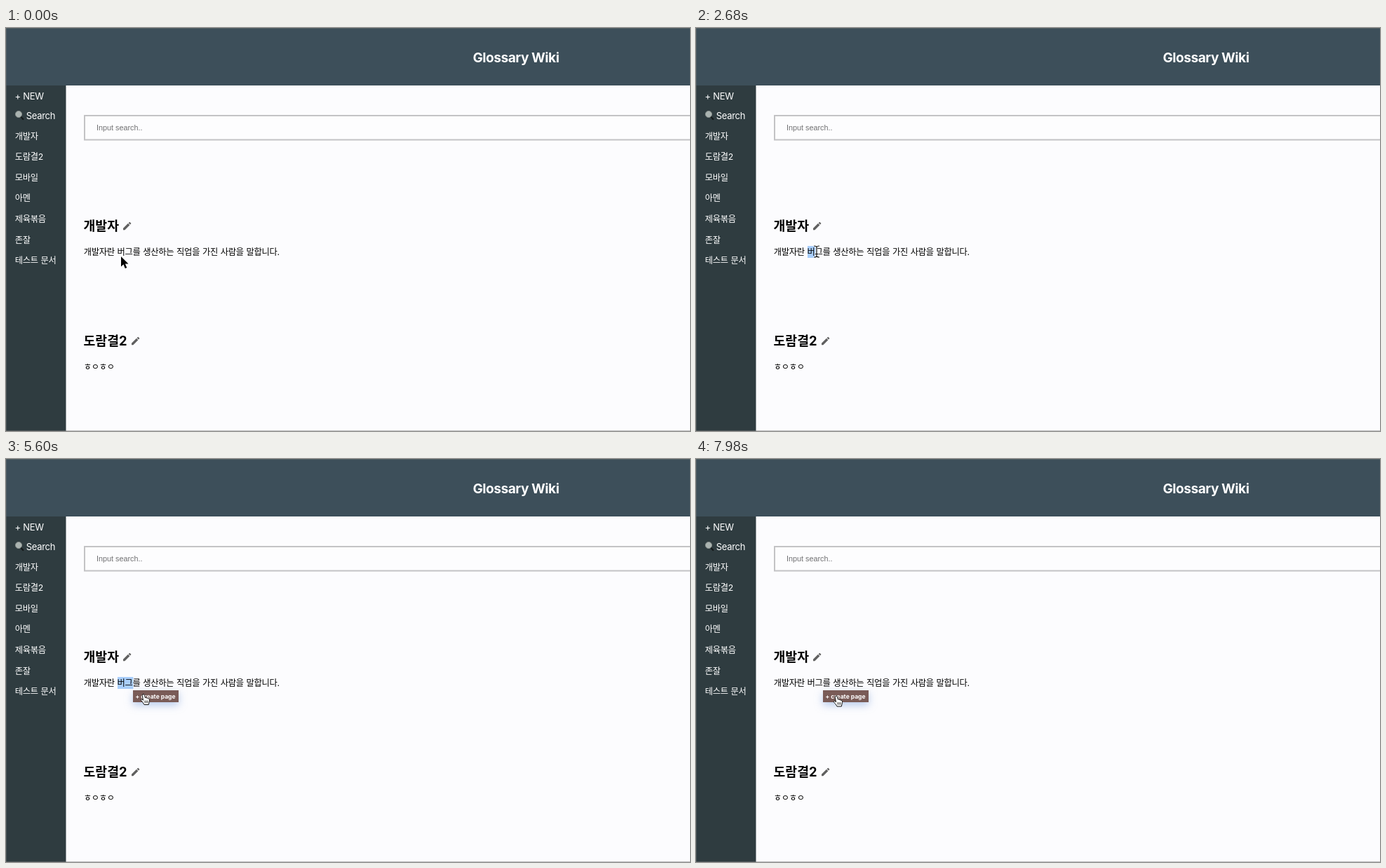
An HTML page for the animation above (8 s loop, 975 by 575 pixels).

```html
<!DOCTYPE html>
<html lang="ko">
<head>
<meta charset="utf-8">
<title>Glossary Wiki</title>
<style>
  html, body { margin: 0; width: 100%; height: 100%; overflow: hidden; background: #fcfcfe; }
  svg { display: block; }
  text { font-family: Inter, "Noto Sans CJK KR", "Noto Sans CJK", sans-serif; white-space: pre; }
  .latin { font-size: 13px; letter-spacing: -.3px; fill: #fff; }
  .ko { font-size: 12.3px; letter-spacing: -.3px; word-spacing: .6px; }
  .side { fill: #fff; }
  .heading { font-size: 18.3px; font-weight: 700; }
  .title { font-size: 19px; font-weight: 700; letter-spacing: -.42px; fill: #fff; }
  .hint { font: 10.8px "Liberation Sans", Arial, sans-serif; fill: #707072; }
  .tip { font-size: 8.5px; font-weight: 700; fill: #fff; }
  #tooltip rect { filter: drop-shadow(0 4px 6px rgba(110, 150, 215, .5)); }
</style>
</head>
<body>
<svg width="975" height="575" viewBox="0 0 975 575">
  <defs>
    <path id="pencil" transform="scale(.63) translate(-3 -3)" fill="#606060"
      d="M3 17.25V21h3.75L17.81 9.94l-3.75-3.75L3 17.25zM20.71 7.04a1 1 0 0 0 0-1.41l-2.34-2.34a1 1 0 0 0-1.41 0l-1.83 1.83 3.75 3.75 1.83-1.83z"/>
    <path id="beamShape" d="M-3.5-8Q0-8 0-6Q0-8 3.5-8M0-6V6M-3.5 8Q0 8 0 6Q0 8 3.5 8M-2 3.5H2"/>
  </defs>

  <rect width="975" height="575" fill="#fcfcfe"/>
  <rect width="975" height="82" fill="#3d4f5a"/>
  <rect y="82" width="85.5" height="493" fill="#2f3c40"/>
  <rect width="975" height="1" fill="#535f62"/>
  <rect y="574" width="975" height="1" fill="#777" opacity=".45"/>
  <rect width="1" height="575" fill="#666d6d" opacity=".5"/>
  <text class="title" x="665.5" y="48.5">Glossary Wiki</text>

  <text class="latin" x="12.5" y="101.5">+ NEW</text>
  <path d="M21 126.5L24.3 130" stroke="#151a1b" stroke-width="2.2" stroke-linecap="round"/>
  <circle cx="18" cy="123" r="4.6" fill="#aab3b0" stroke="#858d8a"/>
  <text class="latin" x="28.7" y="129.5">Search</text>
  <g id="menu"></g>

  <rect x="112" y="125" width="900" height="34.5" fill="#fdfdfe" stroke="#c3c3c5" stroke-width="2"/>
  <text class="hint" x="129" y="145.7">Input search..</text>

  <rect id="selection" x="159" y="311" height="17" fill="#a9cefb"/>
  <text class="heading" x="110.5" y="289">개발자</text>
  <use href="#pencil" x="0" y="0" transform="translate(167 276.8)"/>
  <text class="ko" x="110.7" y="323.6">개발자란 버그를 생산하는 직업을 가진 사람을 말합니다.</text>
  <text class="heading" x="110.5" y="453">도람결2</text>
  <use href="#pencil" transform="translate(179 440.8)"/>
  <text class="ko" x="110.7" y="487.6">ㅎㅇㅎㅇ</text>

  <g id="tooltip">
    <rect x="181" y="330" width="65" height="17" fill="#795b57"/>
    <text class="tip" x="184.5" y="341.6">+ create page</text>
  </g>

  <g id="pointer" stroke-linejoin="round" stroke-linecap="round">
    <path id="arrow" d="M0 0V14.5L3.4 11.3L5.8 17L8.3 16L5.9 10.4H10.5Z" stroke="#fff" stroke-width="1.2" paint-order="stroke"/>
    <g id="beam" fill="none">
      <use href="#beamShape" stroke="#fff" stroke-width="2.6" opacity=".8"/>
      <use href="#beamShape" stroke="#111" stroke-width="1.2"/>
    </g>
    <g id="hand" transform="translate(-3.5 -1.5)" stroke="#111">
      <path fill="#fff" d="M4 1.2C5.2 .8 6 1.8 6.2 3L6.8 6C8 5.4 8.8 6 9 6.6C10 6.2 10.8 6.8 11 7.4C12 7.2 13 7.8 13 9C13.2 11.5 12.5 12.5 11.8 16H5.5C4.5 13.5 2.5 12 1 9.8C.4 8.6 1.8 7.8 3 8.8L4 9.8L2.8 3C2.6 2 3 1.4 4 1.2Z"/>
      <path d="M6.5 10.5V13.3M8.5 10.5V13.3M10.5 10.5V13.3" stroke-width=".8"/>
    </g>
  </g>
</svg>
<script>
const LOOP = 8000;
const $ = id => document.getElementById(id);

const menu = ['개발자', '도람결2', '모바일', '아멘', '제육볶음', '존잘', '테스트 문서'];
$('menu').innerHTML = menu.map((label, i) =>
  `<text class="ko side" x="12.7" y="${158.8 + 29.55 * i}">${label}</text>`).join('');

// Pointer path: time, x, y
const path = [
  [0, 164, 326], [200, 164, 326], [700, 160, 316], [1600, 160, 317],
  [2200, 161, 319], [2650, 172, 319], [2800, 172, 319], [3350, 181, 321.5],
  [4000, 181.5, 322], [4740, 182, 323], [5100, 182, 323], [5750, 197, 338],
  [6400, 197, 338], [7000, 199, 338.5], [8000, 199, 338.5]
];

// Stepped values: start time, value
const shapes = [[0, 'arrow'], [300, 'beam'], [5420, 'hand']];
const selected = [[0, 0], [2560, 11.3], [3080, 22.4], [7000, 0]];
const tooltip = [[0, false], [3900, true]];

const stepAt = (steps, t) => steps.filter(s => s[0] <= t).pop()[1];
const show = (id, on) => $(id).style.display = on ? '' : 'none';

function pointAt(t) {
  const i = path.findIndex(p => p[0] > t);
  const [t0, x0, y0] = path[i - 1], [t1, x1, y1] = path[i];
  const u = (t - t0) / (t1 - t0), e = u * u * (3 - 2 * u);
  return [x0 + (x1 - x0) * e, y0 + (y1 - y0) * e];
}

function draw(t) {
  const shape = stepAt(shapes, t);
  for (const [, id] of shapes) show(id, id === shape);
  $('pointer').setAttribute('transform', `translate(${pointAt(t)})`);
  $('selection').setAttribute('width', stepAt(selected, t));
  show('tooltip', stepAt(tooltip, t));
}

const start = performance.now();
function tick() {
  draw((performance.now() - start) % LOOP);
  requestAnimationFrame(tick);
}
tick();
</script>
</body>
</html>
```
